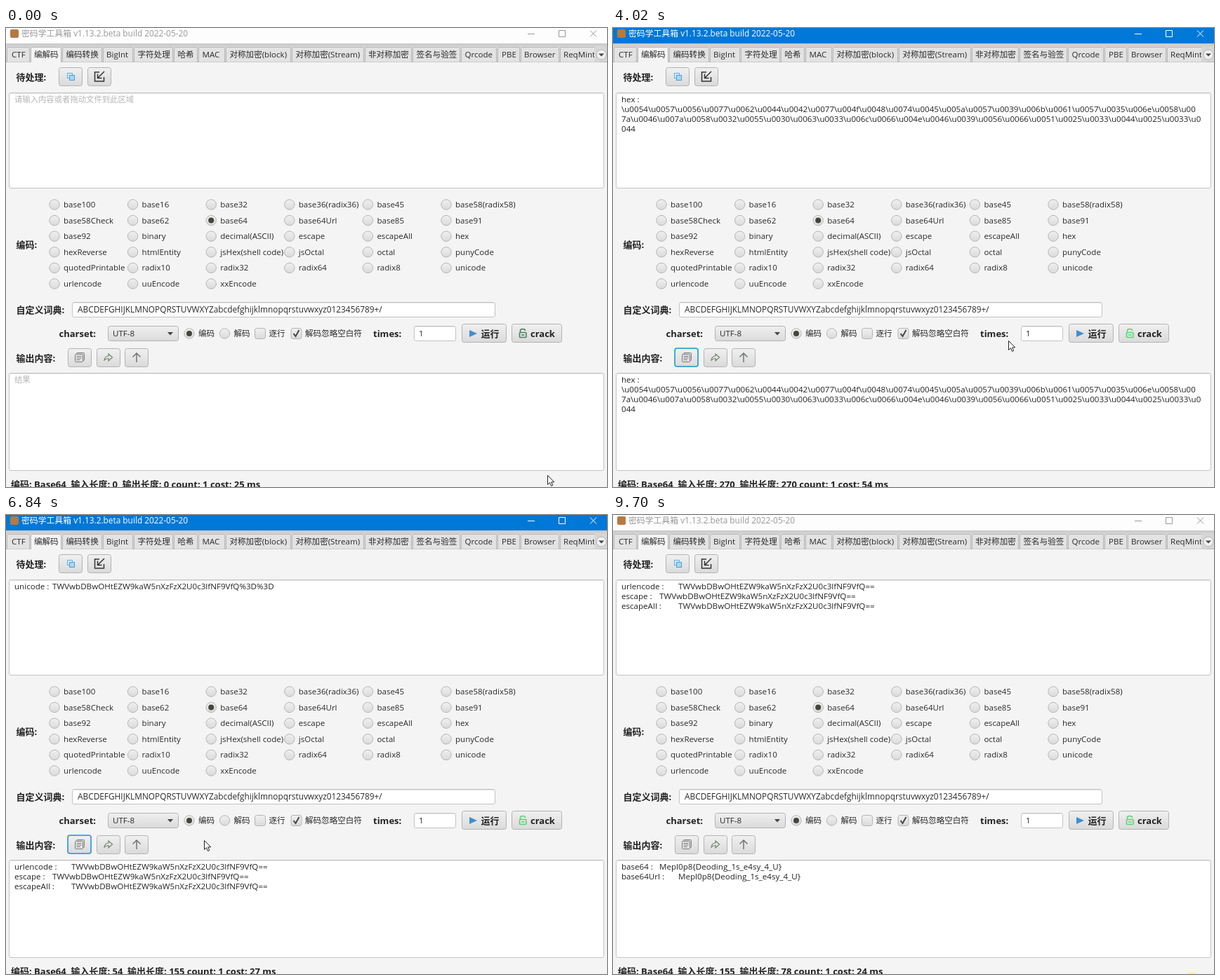
Write an HTML page that moves like this. It is 856 by 655 pixels and loops after 9770 ms.

```html
<!DOCTYPE html>
<html lang="zh-CN">
<head>
<meta charset="utf-8">
<title>密码学工具箱</title>
<style>
  html, body { margin: 0; width: 100%; height: 100%; overflow: hidden; background: #f4f4f4; }
  svg { position: absolute; left: 0; top: 0; }
  svg, .area { font: 11.55px "Open Sans", "Noto Sans CJK SC", "Noto Sans CJK", sans-serif; fill: #2a2a2a; color: #222; }
  text { white-space: pre; }
  .bold { font-size: 13px; font-weight: 700; fill: #222; }
  .area { position: absolute; left: 12px; font-size: 11.6px; line-height: 14.3px; white-space: pre; tab-size: 27px; }
  .area.empty { color: #b5b5b5; font-size: 11.35px; }
  .focus { fill: none; stroke: #1fa3d8; stroke-width: 1.6; }
</style>
</head>
<body>
<svg id="window" width="856" height="655" viewBox="0 0 856 655"></svg>
<div class="area" id="input" style="top:94.6px"></div>
<div class="area" id="output" style="top:494.6px"></div>
<svg id="overlay" width="856" height="655" viewBox="0 0 856 655">
  <path id="cursor" d="M0 0V13L3 10.2L5 15L7.2 14L5.2 9.4H9.2Z" fill="#fff" stroke="#222" stroke-width="1"/>
</svg>
<script>
const LOOP = 9770;
const $ = id => document.getElementById(id);

// ---- Drawing helpers -------------------------------------------------
const text = (x, y, s, attrs = '') => `<text x="${x}" y="${y}" ${attrs}>${s}</text>`;
const bold = (x, y, s) => text(x, y, s, 'class="bold"');
const box = (x, y, w, h, fill, stroke, r = 2.5, attrs = '') =>
  `<rect x="${x + .5}" y="${y + .5}" width="${w - 1}" height="${h - 1}" rx="${r}" fill="${fill}" stroke="${stroke}" ${attrs}/>`;
const line = (d, color, width = 1.2) =>
  `<path d="${d}" fill="none" stroke="${color}" stroke-width="${width}"/>`;
const shape = (d, fill) => `<path d="${d}" fill="${fill}"/>`;
const button = (x, y, w, h, attrs = '') => box(x, y, w, h, 'url(#face)', '#b3b3b3', 3, attrs);
const field = (x, y, w, h) => box(x, y, w, h, '#fff', '#c3c3c3') +
  line(`M${x + 2} ${y + 1.5}H${x + w - 2}`, '#e4e4e4', 1);
const radio = (x, y, label, on) =>
  `<circle cx="${x}" cy="${y}" r="7.2" fill="url(#face)" stroke="#b5b5b5"/>` +
  (on ? `<circle cx="${x}" cy="${y}" r="4" fill="#45453f"/>` : '') + text(x + 13, y + 4, label);
const check = (x, label, on) => button(x, 428, 16, 16) +
  (on ? line(`M${x + 4} 436l3 4l5-9`, '#45453f', 2) : '') + text(x + 20.5, 440, label);
const ring = (id, x, y) =>
  `<rect id="${id}" class="focus" x="${x}" y="${y}" width="33" height="26" rx="3"/>`;

// ---- Window parts ----------------------------------------------------
const defs = `<defs>
  <linearGradient id="face" x2="0" y2="1"><stop stop-color="#f0f0f0"/><stop offset="1" stop-color="#dadada"/></linearGradient>
  <linearGradient id="header" x2="0" y2="1"><stop stop-color="#c9c9c9"/><stop offset=".25" stop-color="#d9d9d9"/><stop offset="1" stop-color="#d4d4d4"/></linearGradient>
</defs>`;

const titleBar = `<rect id="bar" width="856" height="22"/>
  <rect x="6" y="2" width="12" height="12" rx="2" fill="#b8793f"/>
  <g id="title">${text(22, 12, '密码学工具箱 v1.13.2.beta build 2022-05-20', 'font-size="11.85"')}</g>
  <path id="controls" d="M743 8.5H753M787.5 3.5h9v9h-9ZM832 3.5l9 9M841 3.5l-9 9" fill="none"/>`;

const tabs = [
  [1, 33, 'CTF', 8], [35, 78, '编解码', 40], [80, 136, '编码转换', 85.5], [138, 180, 'BigInt', 143],
  [182, 237, '字符处理', 187.5], [239, 272, '哈希', 244.5], [274, 311, 'MAC', 279.5],
  [313, 405, '对称加密(block)', 318.5], [407, 509, '对称加密(Stream)', 412.5], [511, 577, '非对称加密', 516],
  [579, 646, '签名与验签', 584.5], [648, 698, 'Qrcode', 653.5], [700, 731, 'PBE', 706],
  [733, 787, 'Browser', 738], [789, 845, 'ReqMint', 794]
];
const tabBar = `<rect y="22" width="856" height="27" fill="url(#header)"/>` +
  line('M0 48.5H856', '#b8b8b8', 1) +
  tabs.map(([x, end, label, tx], i) =>
    `<path d="M${x + .5} 48.5V29.5q0-2 2-2H${end - 1.5}q2 0 2 2V48.5" fill="${i == 1 ? '#f4f4f4' : '#e3e3e3'}" stroke="#b8b8b8"/>` +
    text(tx, 42, label)).join('') +
  line('M36 48.5H78', '#f4f4f4', 1.4) +
  `<rect x="838" y="26" width="18" height="22" fill="#d6d6d6"/>
   <circle cx="848" cy="38" r="7" fill="#f0f0f0" stroke="#b5b5b5"/>` + shape('M844 36.5h8l-4 4Z', '#444');

const codecs = ('base100,base16,base32,base36(radix36),base45,base58(radix58),base58Check,base62,base64,base64Url,' +
  'base85,base91,base92,binary,decimal(ASCII),escape,escapeAll,hex,hexReverse,htmlEntity,jsHex(shell code),' +
  'jsOctal,octal,punyCode,quotedPrintable,radix10,radix32,radix64,radix8,unicode,urlencode,uuEncode,xxEncode').split(',');
const codecGrid = codecs.map((name, i) =>
  radio(69 + i % 6 * 111.6, 252 + Math.floor(i / 6) * 22.6, name, name == 'base64')).join('');

const inputRow = bold(14.5, 75, '待处理:') + button(75, 56, 34, 27) + button(116, 56, 34, 27) +
  box(87, 64, 8, 8, '#d5ebfa', '#64b1e4', 0) + box(90, 67, 8, 8, '#a9d6f3', '#4a9fd9', 0) +
  line('M133 63H126.500V76H139.500V70M140 62L131 71M130.500 65.500V71.500H136.500', '#333', 1.5) +
  ring('pasteFocus', 116, 56.5);

const settings = bold(14.5, 314, '编码:') + bold(14.5, 406.5, '自定义词典:') + field(94, 391, 603, 22) +
  text(102, 406, 'ABCDEFGHIJKLMNOPQRSTUVWXYZabcdefghijklmnopqrstuvwxyz0123456789+/', 'font-size="11.85"') +
  bold(75.5, 440.5, 'charset:') + button(145, 425, 101, 22) + text(152, 440, 'UTF-8') +
  shape('M230 434h8l-4 4.500Z', '#444') +
  radio(261, 436, '编码', true) + radio(311.5, 436, '解码') +
  check(354, '逐行') + check(405.5, '解码忽略空白符', true) +
  bold(523, 440.5, 'times:') + field(581, 425, 60, 22) + text(588, 440, '1') +
  button(649, 422, 64, 27) + shape('M660 431l11 5l-11 5Z', '#3f8fce') + bold(676.5, 441, '运行') +
  button(720, 422, 72, 27, 'id="crack"') +
  `<g id="lock" fill="none" stroke-width="1.6"><rect x="731.500" y="434.500" width="9.500" height="7" rx="1"/>
   <path d="M732.500 434V432q0-2.500 3.500-2.500t3.500 2.500M734 438h4.500"/></g>` + bold(747, 441, 'crack');

const outputRow = bold(14.5, 475.5, '输出内容:') + [88, 129, 169].map(x => button(x, 457, 34, 27)).join('') +
  box(100, 463, 12, 12, '#d8d8d8', '#7c7c7c', 1) + box(98, 465, 12, 12, '#e2e2e2', '#7c7c7c', 1) +
  line('M100.500 468.500h7M100.500 471h7M100.500 473.500h5', '#7c7c7c', 1) +
  line('M140 474q1-6 6-6V465l5.500 5l-5.500 5V471.500q-3 0-6 2.500Z', '#72806f') +
  line('M186 477V464M180.500 469.500L186 464L191.500 469.500', '#707670', 1.5) +
  ring('copyFocus', 88, 457);

$('window').innerHTML = defs + `<rect width="856" height="655" fill="#f4f4f4"/>` + titleBar + tabBar + inputRow +
  field(4, 92, 848, 137) + codecGrid + settings + outputRow + field(4, 492, 848, 140) +
  `<text id="status" class="bold" x="7" y="656"></text>
   <ellipse id="glow" cx="825" cy="655" rx="7" ry="2.500" fill="#fff2a0"/>`;

// ---- Decoding chain --------------------------------------------------
const flag = 'Mepl0p8{Deoding_1s_e4sy_4_U}';
const base64 = btoa(flag);
const urlCoded = encodeURIComponent(base64);
const hexOf = c => c.charCodeAt(0).toString(16);
const escaped = [...urlCoded].map(c => '\\u' + hexOf(c).padStart(4, '0')).join('');
const hex = [...escaped].map(hexOf).join('');
const texts = [
  hex,
  'hex :\t' + escaped,
  'unicode :\t' + urlCoded,
  `urlencode :\t${base64}\nescape :\t${base64}\nescapeAll :\t${base64}`,
  `base64 :\t${flag}\nbase64Url :\t${flag}`
];
const wrapped = texts.slice();
wrapped[0] = hex.match(/.{1,127}/g).join('\n');
wrapped[1] = ['hex :', escaped.slice(0, 130), escaped.slice(130, 261), escaped.slice(261)].join('\n');
const costs = [25, 54, 62, 27, 24];

// ---- Timeline: the screen is refreshed in discrete ticks -------------
const ticks = [0];
for (const [start, end, count] of [[180, 1170, 6], [1370, 2370, 6], [2570, 3400, 5], [3620, 4620, 6],
  [4820, 5840, 6], [6040, 7040, 6], [7240, 8250, 6], [8450, 9440, 6]])
  for (let k = 0; k < count; k++)
    ticks.push(Math.floor((start + (end - start) * k / (count - 1)) / 10) * 10);
ticks.push(9700);
const LAST = ticks.length - 1;

const inputTicks = [5, 18, 28, 36];
const outputTicks = [13, 24, 32, 40];
const crackHover = [[10, 13], [22, 24], [30, 32], [40, 43]];
const path = [ // tick, x, y
  [0, 771, 638], [4, 132, 68], [5, 132, 68], [6, 126, 147], [7, 337, 287], [10, 752, 434], [13, 752, 434],
  [15, 106, 468], [16, 269, 462], [17, 188, 469], [18, 188, 469], [21, 750, 434], [24, 750, 434],
  [26, 204, 486], [27, 188, 470], [28, 188, 470], [30, 750, 434], [32, 750, 434], [34, 282, 464],
  [35, 190, 470], [36, 190, 470], [39, 752, 434], [42, 752, 434], [43, 690, 449], [44, 576, 500],
  [45, 640, 560], [47, 802, 591], [48, 802, 591]
];

function cursorAt(tick) {
  const i = Math.max(1, path.findIndex(p => p[0] >= tick));
  const [t0, x0, y0] = path[i - 1], [t1, x1, y1] = path[i];
  const u = (tick - t0) / (t1 - t0);
  return [x0 + (x1 - x0) * u, y0 + (y1 - y0) * u];
}

const show = (id, on) => $(id).setAttribute('visibility', on ? 'visible' : 'hidden');
const paint = (id, attr, color) => $(id).setAttribute(attr, color);

function fillArea(id, content, placeholder) {
  $(id).textContent = content || placeholder;
  $(id).classList.toggle('empty', !content);
}

function render(tick) {
  const passed = list => list.filter(t => t <= tick).length;
  const active = tick > 0 && tick < LAST;
  const inputStage = passed(inputTicks) - 1, outputStage = passed(outputTicks);
  const hovered = crackHover.some(([a, b]) => tick >= a && tick <= b);

  paint('bar', 'fill', active ? '#0078d7' : '#fdfdfd');
  paint('title', 'fill', active ? '#fff' : '#999');
  paint('controls', 'stroke', active ? '#fff' : '#999');
  paint('crack', 'fill', hovered ? '#9d9da0' : 'url(#face)');
  paint('lock', 'stroke', !outputStage ? '#4b8061' : hovered ? '#3fa556' : '#56d974');
  show('pasteFocus', tick >= 5 && tick < 15);
  show('copyFocus', tick >= 15 && active);
  show('cursor', tick < LAST);
  show('glow', tick == LAST);

  fillArea('input', wrapped[inputStage], '请输入内容或者拖动文件到此区域');
  fillArea('output', outputStage ? wrapped[outputStage] : '', '结果');
  const inputLength = inputStage < 0 ? 0 : texts[inputStage].length;
  const outputLength = outputStage ? texts[outputStage].length : 0;
  $('status').textContent =
    `编码: Base64  输入长度: ${inputLength}  输出长度: ${outputLength} count: 1 cost: ${costs[outputStage]} ms`;

  const [x, y] = cursorAt(tick);
  $('cursor').setAttribute('transform', `translate(${Math.round(x) + .5} ${Math.round(y) + .5})`);
}

let shown = -1;
function frame() {
  const time = performance.now() % LOOP;
  const tick = ticks.filter(t => t <= time).length - 1;
  if (tick != shown) render(shown = tick);
  requestAnimationFrame(frame);
}
frame();
</script>
</body>
</html>
```
